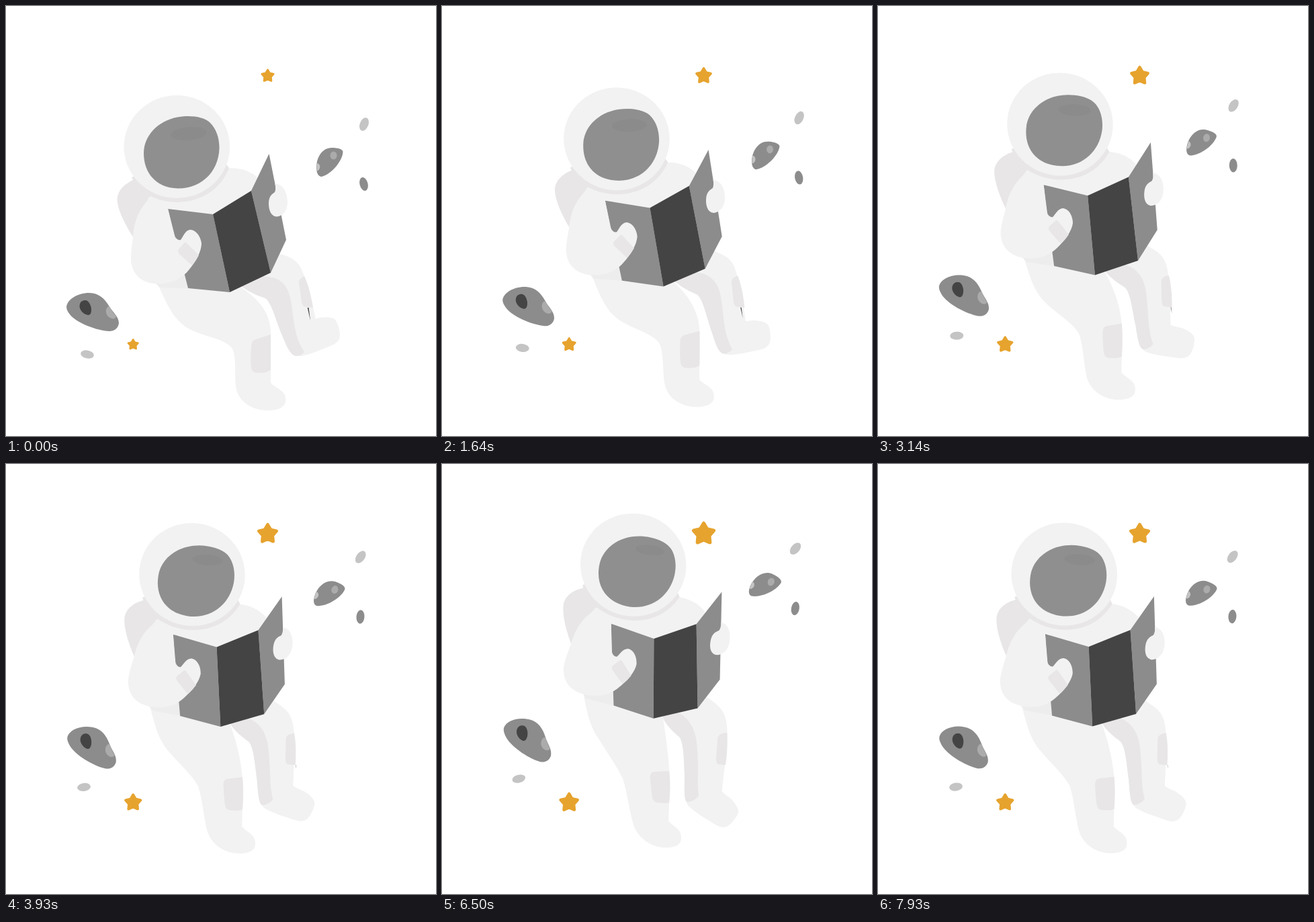
An HTML page for the animation above (8000 ms loop, 640 px wide and 640 px high).

```html
<!DOCTYPE html>
<html lang="en">
<head>
<meta charset="utf-8">
<title>Reading in space</title>
<style>
  html, body { margin: 0; width: 100%; height: 100%; overflow: hidden; background: #fff; }
  svg { display: block; width: 100vw; height: 100vh; }
  .suit { fill: #f2f2f2; }
  .shade { fill: #e8e6e7; }
  .fold { fill: #eeeded; }
  .grey { fill: #8c8c8c; }
  .dark { fill: #444; }
  .pale { fill: #c4c4c4; }
  .mid { fill: #ababab; }
  .star { fill: #e6a32e; stroke: #e6a32e; stroke-width: 3; stroke-linejoin: round; }
</style>
</head>
<body>
<svg viewBox="0 0 640 640">
  <polygon class="star" id="bigStar"/>
  <polygon class="star" id="smallStar"/>

  <g id="leftRock">
    <path class="grey" d="M90 448C91 437 106 427 124 427C138 427 147 436 153 446C158 455 168 462 168 472C167 480 161 484 154 484C135 483 105 472 95 459C92 455 90 452 90 448Z"/>
    <path class="dark" d="M109.5 446C110 440 114 438 118 438C123 438 127 446 127 452C127 458 125 460 122 460C115 459 109 452 109.5 446Z"/>
    <path class="mid" d="M149 452C150 447 154 446 155 449C158 455 162 459 164 462C163 465 160 466 157 465C151 463 148 458 149 452Z"/>
  </g>
  <g id="rightRock">
    <path class="grey" d="M462 240C462 226 470 211 485 211C494 211 501 213 501.5 217C501 230 485 250 470 254C464 254 462 247 462 240Z"/>
    <ellipse class="mid" cx="487.5" cy="222.5" rx="5" ry="6"/>
    <path class="pale" d="M462.5 234C466 234 468 238 467 241C466 244 464 246 462.5 245Z"/>
  </g>
  <ellipse class="pale" id="topPebble" cx="533" cy="176" rx="6.3" ry="10.3"/>
  <ellipse class="grey" id="darkPebble" cx="532.5" cy="265" rx="6" ry="10.2"/>
  <ellipse class="pale" id="lowPebble" cx="121" cy="518.5" rx="10" ry="6"/>

  <g class="body">
    <path class="shade" d="M205 255C190 256 166 268 165.5 288C166 305 180 330 190 345L225 310L225 260Z"/>
  </g>
  <path class="suit" id="farLeg"/>
  <path class="suit" id="farFoot" d="M424 508C427 519 432 522 440 521C455 518 470 511 485 505C494 501 497 496 497 490C497 482 494 473 490 467C484 462 474 463 466 464C458 467 456 467 452 468L440 470Z"/>
  <path class="shade" id="farShade"/>
  <path class="shade" id="farPatch"/>
  <path class="dark" id="sliver"/>
  <g class="body">
    <path class="suit" d="M213 284L325 242C345 239 362 245 373 254L385 290L380 390L330 415L228 418L200 380L205 300Z"/>
  </g>
  <g id="nearGroup">
    <path class="suit" id="nearLeg"/>
    <path class="shade" id="nearPatch"/>
  </g>
  <g class="body">
    <path class="fold" d="M222 412L271 395L271 420L229 419Z"/>
    <path class="shade" d="M187 255C208 303 305 310 332 241L300 200Z"/>
    <ellipse class="suit" cx="254.3" cy="209.5" rx="78.8" ry="76.5"/>
    <path fill="#8f8f8f" d="M205 219C205 190 232 164 271 164C285 164 297 167 304 174C312 182 317.5 195 317.5 211C317 245 292 271.5 257 271.5C225 271.5 205 250 205 219Z"/>
    <ellipse id="glint" fill="#8b8b8b"/>
    <path class="grey" d="M241 302L308 310L333 426L271 420ZM365 275L391.5 220L417 348L394 397Z"/>
    <path class="dark" d="M308 310L365 275L394 397L333 426Z"/>
    <path class="suit" d="M215 285C195 305 190 325 189 345C186 365 185 380 187 385C191 403 205 413 225 413.5C250 414 265 402 272 393C283 380 291 365 291 353C289 340 281 333 274 333C266 334 263 345 260 348C256 349 252 346 250 340L241 302Z"/>
    <path class="shade" d="M266 352Q268 351 270 354L287 371Q283 379 277 386L260 371Q254 366 257 362Z"/>
    <path class="suit" d="M400.5 265C412 264 419 278 419 292C419 305 411 313 403 313.5C394 313 391 303 391 294C391 283 396 280 400 277C402 273 401 268 400.5 265Z"/>
  </g>
</svg>
<script>
const LOOP = 8000, RISE = 5950;
const byId = id => document.getElementById(id);
const lerp = (a, b, k) => a + (b - a) * k;
const set = (id, attrs) => {
  for (const name in attrs) byId(id).setAttribute(name, attrs[name]);
};

// Paths that bend: low pose, high pose (same commands in both)
const morphs = {
  farLeg: [
    "M350 417C365 428 378 432 386 435C396 442 402 470 411 490C417 505 423 520 432 521L444 515L461 466C455 440 451 418 441 395C436 380 424 373 408 369L380 360Z",
    "M328 376C334 390 344 398 353 406C360 415 360 440 361 462C361 480 360 499 364 503L382 494L416 496C418 470 424 430 425 405C424 370 418 364 396 348L350 340Z"],
  farShade: [
    "M350 417C365 428 378 432 386 435C396 442 402 470 411 490C417 505 423 520 432 521C437 521 441 518 444 515C434 500 430 485 427 460C424 435 422 418 406 408C398 403 390 403 378 402Z",
    "M328 376C334 390 344 398 353 406C360 415 360 440 361 462C361 480 360 499 364 503C370 504 378 499 382 494C380 480 381 465 381 445C380 415 379 400 368 384C362 376 356 372 348 368Z"],
  farPatch: [
    "M444 402C438 405 436 407 436 412L440 440C441 447 444 448 448 448L457 449C454 430 450 415 444 402Z",
    "M424 400C413 401 410 404 410 412L408 438C408 446 410 447 413 447L422 448C425 430 425 412 424 400Z"],
  sliver: ["M448.7 449L450.5 449L453 468Z", "M425 448L425 448L425 449Z"],
  nearLeg: [
    "M226 414C240 445 248 464 268 478C290 492 326 494 337 510C343 525 340 545 342 566C345 590 368 602 390 602C408 602 416 595 416 588C418 572 402 570 394 561L394 487C394 455 374 435 350 419L320 400L228 400Z",
    "M211 344C216 372 221 392 233 409C245 428 260 450 269 468C275 485 278 513 285 537C293 560 315 571 333 571C350 571 356 565 356 557C357 543 344 540 337 531L339 487C340 450 333 405 329 378L310 350L215 335Z"],
  nearPatch: [
    "M394 489L372 496C366 498 366 502 365 508C364 520 364 530 365 538C366 546 372 546 378 546C386 546 391 544 394 541C394 520 394 505 394 489Z",
    "M338 457L316 458C310 459 309 464 310 470C311 480 312 490 313 496C315 504 319 504 323 504C329 505 334 505 338 504C340 488 340 470 338 457Z"]
};

function morph([low, high], k) {
  const ends = high.match(/[\d.]+/g);
  let i = 0;
  return low.replace(/[\d.]+/g, n => lerp(+n, +ends[i++], k).toFixed(2));
}

// Move by (dx, dy) while turning from one angle to another around (x, y)
const drift = (k, x, y, dx, dy, to, from = 0) =>
  `translate(${dx * k} ${dy * k}) rotate(${lerp(from, to, k)} ${x} ${y})`;

const starPoints = Array.from({ length: 10 }, (_, i) => {
  const r = i % 2 ? 5 : 9, a = i * Math.PI / 5;
  return [r * Math.sin(a), -r * Math.cos(a)];
}).join(" ");
set("bigStar", { points: starPoints });
set("smallStar", { points: starPoints });

function draw(t) {
  const u = t < RISE ? t / RISE : 2 - t / RISE;
  const k = u * u * (3 - 2 * u) / 0.976;

  set("bigStar", { transform: `translate(389.5 104) scale(${1 + 0.825 * u})` });
  set("smallStar", { transform: `translate(189.2 504) scale(${0.85 + 0.675 * u})` });

  set("leftRock", { transform: drift(k, 128, 454, -0.5, -46.5, 14) });
  set("rightRock", { transform: drift(k, 481, 232, -1.1, -50.7, 25) });
  set("topPebble", { transform: drift(k, 533, 176, -7, -50, 41, 22) });
  set("darkPebble", { transform: drift(k, 532.5, 265, -6.7, -50, 10, -14) });
  set("lowPebble", { transform: drift(k, 121, 518.5, -6.7, -50, -14, 12) });

  for (const part of document.querySelectorAll(".body"))
    part.setAttribute("transform", drift(k, 308, 310, 7.4, -50, 12.5));
  for (const id in morphs) set(id, { d: morph(morphs[id], k) });
  set("farFoot", { transform: drift(k, 432, 520, -68, -17, 54) });
  set("nearGroup", { transform: `translate(0 ${5 * k * (1 - k)})` });
  set("glint", {
    cx: lerp(272, 274, k), cy: lerp(190, 182.5, k),
    rx: lerp(27, 21.5, k), ry: lerp(10, 7.5, k),
    transform: `rotate(-5 ${lerp(272, 274, k)} ${lerp(190, 182.5, k)})`
  });
}

function tick() {
  draw(performance.now() % LOOP);
  requestAnimationFrame(tick);
}
tick();
</script>
</body>
</html>
```
